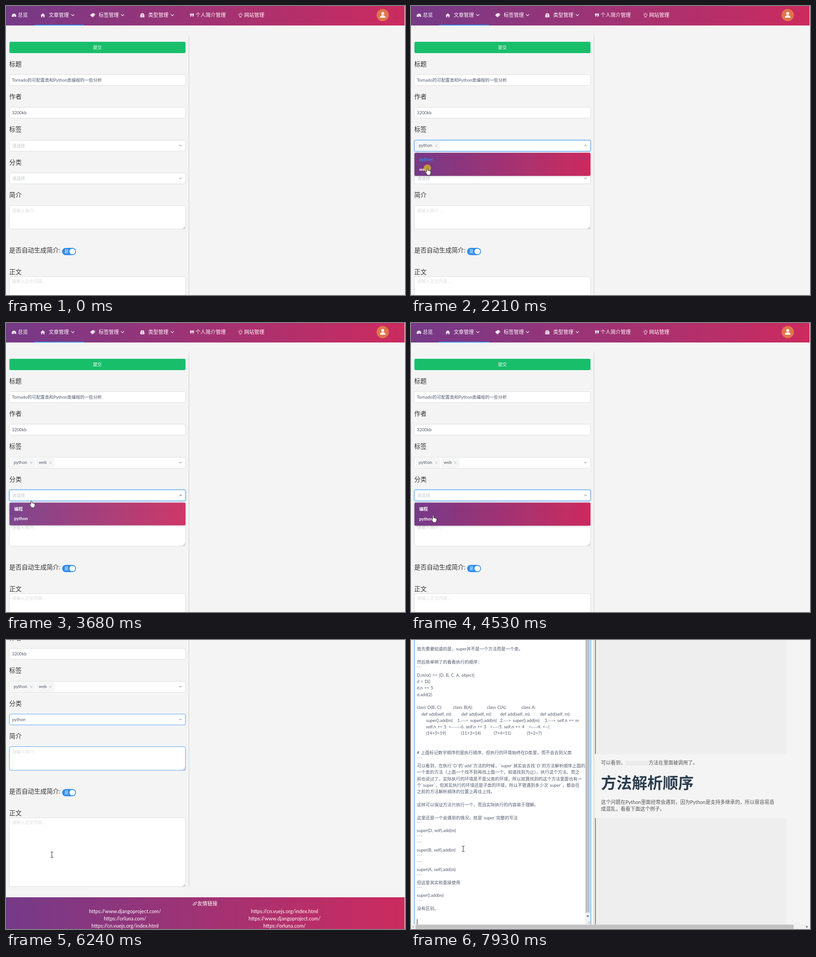
Write an HTML page that moves like this. It is 878 by 638 pixels and loops after 8 s.

```html
<!DOCTYPE html>
<html lang="zh">
<head>
<meta charset="utf-8">
<style>
html, body { margin: 0; width: 100%; height: 100%; overflow: hidden; background: #f4f4f4 }
svg { display: block; width: 878px; height: 638px }
text { font-family: Lato, "Noto Sans CJK SC", "Noto Sans CJK", sans-serif; word-spacing: .07em; white-space: pre }
.line { fill: none; stroke-linecap: round; stroke-linejoin: round }
</style>
</head>
<body>
<svg id="stage" viewBox="0 0 878 638"></svg>
<script>
const BLUE = '#2d8cf0', INK = '#515a6e', HINT = '#c5c8ce';
const $ = id => document.getElementById(id);

const text = (x, y, str, size = 9.55, fill = INK, more = '') =>
  `<text x="${x}" y="${y}" font-size="${size}" fill="${fill}" ${more}>${str.replace(/</g, '&lt;')}</text>`;
const rect = (x, y, w, h, fill, more = '') =>
  `<rect x="${x}" y="${y}" width="${w}" height="${h}" fill="${fill}" ${more}/>`;
const line = (d, stroke, width = 1, more = '') =>
  `<path class="line" d="${d}" stroke="${stroke}" stroke-width="${width}" ${more}/>`;
const group = (id, body, more = '') => `<g id="${id}" ${more}>${body}</g>`;
const label = (y, str) => text(7, y, str, 13.7, '#333');
const grip = y => line(`M389 ${y - 2}l5-5M392 ${y - 2}l2-2`, '#888', .8);

// Input box with a hover border and a focus halo
const field = (id, y, h) =>
  rect(6.5, y - .5, 389.5, h + 2, 'none', `id="${id}Halo" rx="4" stroke="${BLUE}" stroke-opacity=".25" stroke-width="2" opacity="0"`) +
  rect(7.5, y + .5, 387.5, h, '#fff', 'rx="3" stroke="#dddee1"') +
  rect(7.5, y + .5, 387.5, h, 'none', `id="${id}Edge" rx="3" stroke="#57a3f3" opacity="0"`);
const chevron = (id, y) =>
  `<g transform="translate(384 ${y})">${line('M-2.5-1.2L0 1.3L2.5-1.2', '#666', 1, `id="${id}"`)}</g>`;
const tag = (id, x, w, str, tx) => group(id,
  rect(x + .5, 299.5, w, 18, '#f7f7f7', 'rx="2" stroke="#e8eaec"') + text(tx, 311, str) +
  line(`M${x + w - 10} 306l5 5m0-5l-5 5`, '#aaa', .8));
const menu = (id, y, a, b, aId, bId) =>
  `<g transform="translate(0 ${y})">` + group(id,
    rect(7.5, 0, 387.5, 51, 'url(#grad)', 'rx="3" filter="url(#shade)"') +
    text(18, 17.5, a, 9.55, '#fff', `font-weight="bold" id="${aId}"`) +
    text(18, 39.5, b, 9.55, '#fff', `font-weight="bold" id="${bId}"`) +
    line('M378 13l2 2l4-4', '#3a5fc0', 1, `id="${id}Check"`)) + '</g>';

function nav() {
  const items = [[26, '总览'], [94, '文章管理', 147], [204, '标签管理', 256.5], [313, '类型管理', 366],
    [417, '个人简介管理'], [524, '网站管理']];
  return rect(0, 0, 877, 43, 'url(#grad)') + rect(62, 41.3, 110, 1.7, BLUE) +
    items.map(([x, str, arrow]) => text(x, 24, str, 11.1, '#fff') +
      (arrow ? line(`M${arrow - 3} 18.7l3 3l3-3`, '#fff', 1.2) : '')).join('') +
    `<g fill="#f3e8f0">
      <path d="M13 24a5 5 0 1 1 9 0h-2.5l-2-4v4z"/>
      <path d="M76 20.5l5-4.500l5 4.500h-1.300v4.500h-2.500v-3h-2.400v3h-2.500v-4.500z"/>
      <path d="M185 20l5-4h4.500v4.500l-5 4z"/><path d="M190 25l5.500-4.500v-3" fill="none" stroke="#f3e8f0"/>
      <path d="M295.500 20l2-4h5l2 4v5h-9z"/>
      <path d="M405 16.500h3.700v4l-1.700 3.500h-1.500l1-3h-1.500zM409.700 16.500h3.700v4l-1.700 3.500h-1.500l1-3h-1.500z"/>
    </g>` +
    rect(298, 18, 4, 1, '#a03878') + rect(298, 21.5, 4, 1, '#a03878') +
    line('M514.500 22.500a2.800 2.800 0 1 1 3 0v2h-3zM516 14.500v1M511.500 19.500h1M519.700 19.500h1M512.600 16l.7.7M519.400 16l-.7.7', '#fff', .9) +
    `<circle cx="829" cy="20" r="13.600" fill="#e0754c"/><circle cx="829" cy="16.500" r="3.200" fill="#fff"/>
     <path d="M822.800 25.800c0-7 12.400-7 12.400 0z" fill="#fff"/>`;
}

function footer() {
  const urls = ['https://www.djangoproject.com/', 'https://orluna.com/', 'https://cn.vuejs.org/index.html'];
  const link = (x, row, i) => text(x, 807.5 + row * 16.4, urls[i], 11.1, '#fff', 'text-anchor="middle"');
  return rect(0, 773, 877, 80, 'url(#grad)') + text(421, 791, '友情链接', 11.1, '#fff') +
    line('M415 786l2-2.200a1.700 1.700 0 0 1 2.500 2.500l-2.300 2.400a1.700 1.700 0 0 1-2.400 0M416.500 788l-2 2.200a1.700 1.700 0 0 1-2.500-2.500l2.300-2.400a1.700 1.700 0 0 1 2.400 0', '#fff') +
    [0, 1, 2].map(i => link(262, i, i) + link(613, i, (i + 2) % 3)).join('');
}

function form() {
  return nav() + line('M402.500 66V750', '#ccc') +
    rect(7.5, 79, 387.5, 25, '#19be6b', 'rx="3"') + text(201, 95, '提交', 9.55, '#fff', 'text-anchor="middle"') +
    label(133, '标题') + field('title', 151, 24) + text(13, 167, 'Tornado的可配置类和Python类编程的一些分析') +
    label(205, '作者') + field('author', 223, 24) + text(13, 239, '3200kb') +
    label(277, '标签') + field('tags', 296, 24) + text(13.5, 311.5, '请选择', 9.55, HINT, 'id="tagsHint"') +
    tag('tagPython', 11, 52, 'python', 17) + tag('tagWeb', 67, 38, 'web', 72) + chevron('tagsArrow', 308) +
    label(350, '分类') + field('kind', 368, 24) + text(13.5, 383.5, '请选择', 9.55, HINT, 'id="kindHint"') +
    text(13.5, 383.5, 'python', 9.55, INK, 'id="kindValue"') + chevron('kindArrow', 380.5) +
    label(422, '简介') + field('intro', 440, 52) + text(13, 454.5, '请输入简介...', 9.55, '#dcdcdc') + grip(494) +
    label(544, '是否自动生成简介:') + rect(123.5, 534, 30.5, 16, BLUE, 'rx="8"') +
    '<circle cx="146" cy="542" r="6.300" fill="#fff"/>' + text(128.5, 545.2, '是', 9.2, '#fff') +
    label(592, '正文') + field('body', 597, 152) + text(13, 611, '请输入正文内容...', 9.55, '#dcdcdc') + grip(751) +
    rect(13, 602, 1, 12, '#222', 'id="caret"') + footer() +
    menu('tagsMenu', 324, 'python', 'web', 'optPython', 'optWeb') +
    menu('kindMenu', 396.5, '编程', 'python', 'optCode', 'optKind');
}

// Pasted article: one entry per row, "@x" starts a piece at its own column
const article = `首先需要知道的是，super并不是一个方法而是一个类。

然后简单明了的看看执行的顺序：
\`\`\`
D.mro() == [D, B, C, A, object]
d = D()
d.n == 5
d.add(2)

class D(B, C):@93 class B(A):@167 class C(A):@243 class A:
@23 def add(self, m):@111 def add(self, m):@196 def add(self, m):@284 def add(self, m):
@33 super().add(m)@102 1.--->@130 super().add(m)@196 2.--->@224 super().add(m)@294 3.--->@322 self.n += m
@33 self.n += 5@83 <------6. self.n += 3@174 <----5. self.n += 4@259 <----4. <--|
@33 (14+5=19)@110 (11+3=14)@182 (7+4=11)@255 (5+2=7)


# 上面标记数字顺序的是执行顺序，但执行的环境始终在D类里，而不会去到父类
\`\`\`
可以看到，在执行\`D\`的\`add\`方法的时候，\`super\`其实会去找\`D\`的方法解析顺序上面的
一个类的方法（上面一个找不到再找上面一个，知道找到为止），执行这个方法。而之
前也说过了，实际执行的环境是不是父类的环境，所以就算找到的这个方法里面也有一
个\`super\`，但其实执行的环境还是子类的环境，所以不管遇到多少次\`super\`，都会在
之前的方法解析顺序的位置上再往上找。

这样可以保证方法只执行一个，而且实际执行的内容易于理解。

这里还是一个会遇到的情况，就是\`super\`完整的写法
\`\`\`
super(D, self).add(m)
\`\`\`
\`\`\`
super(B, self).add(m)
\`\`\`
\`\`\`
super(A, self).add(m)
\`\`\`
但这里其实和直接使用
\`\`\`
super().add(m)
\`\`\`
没有区别。`;

function result() {
  const rows = article.split('\n').map((row, i) => row.split('@').map(piece => {
    const [, x, str] = piece.match(/^(?:(\d+) )?(.*)$/);
    return str && text(x || 13, 23.3 + i * 14.32, str);
  }).join('')).join('');
  const code = (y, h) => rect(405, y, 421, h, '#eee') + rect(405, y, 1.5, h, '#666');
  return rect(6, 0, 391, 628, '#cfe3fa') + rect(7, 0, 389, 628, '#57a3f3') + rect(8, 0, 387, 628, '#fff') +
    rect(383, 0, 12, 628, '#f1f1f1') + rect(384, 0, 9.5, 602, '#c1c1c1') +
    '<path d="M386 608.500h6l-3 3z" fill="#444"/>' + grip(628) +
    rows + rect(13, 616, 1, 12, '#222') + line('M402.500 0V628', '#ccc') +
    code(0, 251.5) + code(393, 235) +
    text(418, 275, '可以看到，', 10.8, '#555') + rect(473, 267, 50, 10, '#ebebeb') +
    text(523, 275, '方法在里面被调用了。', 10.8, '#555') +
    text(418, 327.5, '方法解析顺序', 34, '#2c3e50', 'font-weight="bold"') +
    text(418, 361.5, '这个问题在Python里面经常会遇到，因为Python是支持多继承的，所以很容易造', 10.8, '#555') +
    text(418, 377, '成混乱，看看下面这个例子。', 10.8, '#555') +
    rect(0, 628, 878, 10, '#f1f1f1') + rect(10, 628.5, 832, 9, '#c1c1c1') +
    '<path d="M6 630.500v5l-3-2.500z" fill="#aaa"/><path d="M870 630.500v5l3-2.500z" fill="#444"/>';
}

const pointers = {
  arrow: '<path d="M0 0v14l3.200-3l2.200 5l2-.9l-2.200-4.900h4.500z" fill="#fff" stroke="#222" stroke-width=".8"/>',
  hand: '<path d="M-1.500 1c0-1.600 2.500-1.600 2.500 0v4.500c1-1 2.200-.7 2.400.3c1-.6 2.100-.1 2.300.7c1.200-.4 2 .2 2 1.300c0 3-.4 4.300-1.700 5.700v2h-6.500v-1.500l-3.700-5c-.8-1.400.8-2.200 1.700-1.200l1 1z" fill="#fff" stroke="#222" stroke-width=".9"/>',
  beam: line('M-2.500-6h1.800L0-5.300L.7-6h1.800M0-5.300V5.300M-2.500 6h1.800L0 5.300L.7 6h1.800', '#222', 1)
};

$('stage').innerHTML = `<defs>
  <linearGradient id="grad"><stop stop-color="#753a88"/><stop offset="1" stop-color="#cc2b5e"/></linearGradient>
  <filter id="shade" x="-5%" y="-20%" width="110%" height="150%"><feDropShadow dx="0" dy="1" stdDeviation="2" flood-opacity=".2"/></filter>
  </defs>` + group('form', form()) + group('result', result()) +
  group('cursor', '<circle id="press" r="8" fill="#d6b32c" opacity=".8"/>' +
    Object.keys(pointers).map(k => group(k, pointers[k])).join(''));

const ease = p => (p = Math.min(1, Math.max(0, p)), p * p * (3 - 2 * p));
const ramp = (t, start, span = 200) => ease((t - start) / span);
const pulse = (t, on, off, span = 200) => ramp(t, on, span) - ramp(t, off, span);
const between = (t, a, b) => t >= a && t < b;
const set = (id, name, value) => $(id).setAttribute(name, value);
const show = (id, on) => set(id, 'visibility', on ? 'inherit' : 'hidden');

// Time, x, y of the pointer
const path = [[70, 706, 478], [830, 90, 308], [950, 88, 308], [1500, 36, 337], [1850, 36, 337], [2130, 36, 358],
  [2300, 36, 358], [2440, 45, 371], [2750, 58, 379], [3400, 58, 379], [4150, 52, 421], [4220, 49, 425],
  [4530, 49, 425], [4600, 45, 435], [5140, 45, 435], [5900, 101, 474], [7929, 101, 474], [7930, 115, 461]];
const presses = [[830, 950], [1670, 1830], [2150, 2290], [2750, 2860], [3370, 3480], [4600, 4760], [6640, 6790]];

function pointerAt(t) {
  const i = path.findIndex(p => p[0] > t);
  if (i < 0) return path[path.length - 1].slice(1);
  if (!i) return path[0].slice(1);
  const [a, b] = [path[i - 1], path[i]], k = ease((t - a[0]) / (b[0] - a[0]));
  return [a[1] + (b[1] - a[1]) * k, a[2] + (b[2] - a[2]) * k];
}

function glow(id, edge, halo = 0) {
  set(id + 'Edge', 'opacity', Math.max(edge, halo));
  set(id + 'Halo', 'opacity', halo);
}

function drop(name, open) {
  set(name + 'Menu', 'opacity', open);
  set(name + 'Menu', 'transform', `scale(1 ${.8 + .2 * open})`);
  set(name + 'Arrow', 'transform', `rotate(${180 * open})`);
}

function draw(t) {
  const done = t >= 7930;
  show('form', !done);
  show('result', done);
  set('form', 'transform', `translate(0 ${-205 * ramp(t, 5940, 300)})`);

  drop('tags', pulse(t, 900, 2860, 300));
  drop('kind', pulse(t, 3430, 5140, 300));
  if (t > 2860) set('tagsArrow', 'transform', `rotate(${180 * (1 - ramp(t, 2760))})`);

  const python = t >= 1830, web = t >= 2290, chosen = t >= 5140;
  show('tagsHint', !python);
  show('tagPython', python);
  show('tagWeb', web);
  show('tagsMenuCheck', python);
  show('kindMenuCheck', false);
  set('optPython', 'fill', python ? BLUE : '#fff');
  set('optWeb', 'fill', web ? BLUE : '#fff');
  show('kindHint', !chosen);
  show('kindValue', chosen);

  glow('tags', pulse(t, 720, 2800), pulse(t, 900, 2760));
  glow('kind', pulse(t, 2450, 6730), pulse(t, 3430, 5240));
  glow('intro', pulse(t, 5600, 6390));
  glow('body', ramp(t, 6390), ramp(t, 6730));
  show('caret', between(t, 6790, 7320) || t >= 7850);

  const [x, y] = pointerAt(t);
  const shape = x > 395 ? 'arrow' : y >= 442 ? 'beam' : 'hand';
  set('cursor', 'transform', `translate(${x} ${y})`);
  show('cursor', t >= 70);
  for (const k in pointers) show(k, k === shape);
  show('press', presses.some(([a, b]) => between(t, a, b)));
}

const start = performance.now();
(function frame() {
  draw((performance.now() - start) % 8000);
  requestAnimationFrame(frame);
})();
</script>
</body>
</html>
```
